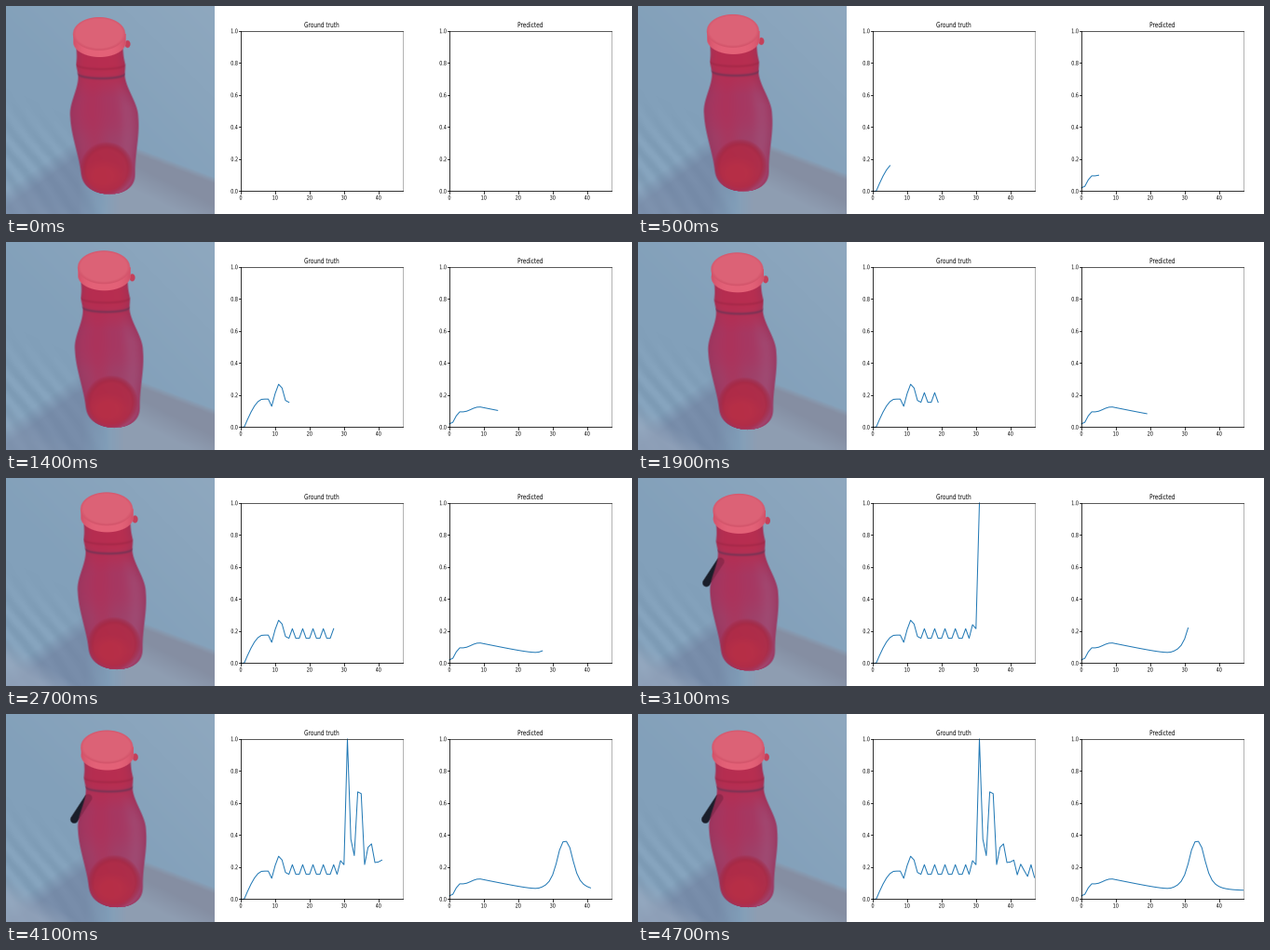
A matplotlib script for the animation above (4.8 s loop, 672 by 224 pixels).

```python
import numpy as np
import matplotlib.pyplot as plt
from matplotlib.animation import FuncAnimation
from matplotlib.patches import PathPatch
from matplotlib.textpath import TextPath
from matplotlib.transforms import Affine2D

N = 48
SIDE = 224
DPI = 100
PX = 72 / DPI
PEN_START = 31

Y, X = np.mgrid[0:SIDE, 0:SIDE] + 0.5


def smooth(t):
    t = np.clip(t, 0, 1)
    return t * t * (3 - 2 * t)


def tent(i, centre, height, width):
    return height * np.maximum(0, 1 - np.abs(i - centre) / width)


def truth(i):
    """Quick rise, steady ripple, two spikes, then a decaying ripple."""
    level = 0.175 * np.sin(np.pi / 2 * np.clip((i - 1) / 5.5, 0, 1))
    ripple = 0.04 * np.cos(2 * np.pi * i / 3) * (i > 12)
    bumps = tent(i, 9, -0.045, 1) + tent(i, 11.3, 0.11, 1.9) + tent(i, 29, 0.085, 1)
    spike = np.where(i >= 31, 0.845 * np.exp(-1.35 * np.maximum(i - 31, 0)), 0)
    early = level + ripple + bumps + spike + tent(i, 34.5, 0.75, 1.5)
    late = 0.16 + 0.14 * np.exp(-(i - 38) / 3) + 0.045 * np.cos(0.75 * np.pi * (i - 38))
    return np.where(i < 37, early, late)


def predicted(i):
    """Two-step rise, slow decline, one rounded peak."""
    rise = 0.02 + 0.075 * smooth((i - 0.4) / 2.6) + 0.03 * smooth((i - 4) / 4.5)
    base = np.maximum(rise - 0.0044 * np.maximum(i - 9, 0), 0.052 * (i > 9))
    return base + 0.31 / (1 + (np.abs(i - 33.6) / 2.75) ** 2.8)


def drift(k):
    dx = 8.6 * np.sin(np.pi * k / 70)
    dy = 8.8 * smooth((k - 10) / 25) - 3.3 * smooth(k / 6)
    return dx, dy


def soft(d, width=1.0):
    return np.clip(0.5 + d / width, 0, 1)


def ellipse(x, y, cx, cy, rx, ry, width=1.0):
    r = np.hypot((x - cx) / rx, (y - cy) / ry)
    return soft((1 - r) * min(rx, ry), width)


def segment(x, y, a, b, radius, width=1.5):
    dx, dy = b[0] - a[0], b[1] - a[1]
    t = np.clip(((x - a[0]) * dx + (y - a[1]) * dy) / (dx * dx + dy * dy), 0, 1)
    return soft(radius - np.hypot(x - a[0] - t * dx, y - a[1] - t * dy), width)


def blend(img, rgb, mask):
    return img + (np.array(rgb, float) - img) * mask[..., None]


def cloth(x, y, k):
    img = np.empty((SIDE, SIDE, 3))
    img[:] = (130, 160, 186)
    img = blend(img, (146, 170, 192), np.clip((X - Y + 40) / 330, 0, 1))
    # folds at the lower left
    ridge = np.sin((X - 0.75 * Y) / 3.5 + 0.6 * np.sin(Y / 17))
    zone = soft(Y - 118 - 0.45 * X, 60) * soft(85 - X, 50)
    img = img + (ridge * zone * 5)[..., None]
    left = soft(y - 208 + 0.72 * x, 20) * soft(92 - x, 30)
    img = blend(img, (112, 127, 158), 0.6 * left)
    corner = soft(Y - 185 - 0.65 * X, 24)
    img = blend(img, (152, 168, 190), corner * (0.15 + 0.55 * smooth((k - 12) / 8)))
    # cast shadow to the right
    top = y - 156 - 0.38 * (x - 140)
    low = 186 + 0.5 * (x - 140) - y
    right = soft(x - 112, 20)
    img = blend(img, (148, 156, 174), 0.7 * soft(top, 7) * right)
    return blend(img, (130, 138, 158), 0.75 * soft(top, 7) * soft(low, 26) * right)


def outline(y):
    """Centre and half width of the bottle at each height."""
    mid = 101.5 + 0.067 * (y - 60)
    half = 25 + 11.5 * smooth((y - 74) / 44) - 7.5 * smooth((y - 122) / 62)
    half = half + 1.2 * np.exp(-((y - 64) / 7) ** 2)
    foot = np.clip((y - 178) / 25, 0, 1)
    return mid, half * np.sqrt(1 - foot ** 2.5) + 0.01


def photo(k):
    dx, dy = drift(k)
    x, y = X - dx, Y - dy
    img = cloth(x, y, k)
    pen = segment(x, y, (65, 108), (80, 85), 4.2) if k >= PEN_START else 0 * x
    img = blend(img, (26, 30, 42), pen)

    mid, half = outline(y)
    u = np.clip((x - mid) / half, -1, 1)
    body = soft(half - abs(x - mid), 2) * soft(203 - y, 2) * soft(y - 46)
    tint = np.empty_like(img)
    tint[:] = (166, 56, 98)
    tint = blend(tint, (184, 46, 80), soft(84 - y, 30))
    tint = blend(tint, (156, 68, 108), 0.7 * np.exp(-((y - 148) / 18) ** 2))
    tint = blend(tint, (142, 50, 90), 0.5 * np.abs(u) ** 5)
    tint = blend(tint, (160, 84, 124), 0.5 * np.exp(-((u - 0.7) / 0.25) ** 2) * soft(y - 95, 30))
    tint = blend(tint, (180, 44, 82), 0.4 * np.exp(-((u + 0.35) / 0.35) ** 2))
    base = ellipse(x, y, 108, 175, 26, 26, 6)
    tint = blend(tint, (176, 42, 68), 0.85 * base)
    rim = base * (1 - ellipse(x, y, 108, 177, 24, 25, 6))
    tint = blend(tint, (146, 36, 66), 0.5 * rim)
    tint = blend(tint, (190, 50, 70), 0.5 * ellipse(x, y, 105, 183, 17, 13, 10))
    tint = blend(tint, (90, 24, 50), 0.35 * pen)
    img = blend(img, tint, body)

    # neck rings
    bow = 5 * np.sqrt(1 - u ** 2) - 3
    for ring, rgb, a in ((76, (104, 52, 84), 0.65), (66, (152, 36, 66), 0.45)):
        img = blend(img, rgb, a * body * np.exp(-((y - ring - bow) / 1.5) ** 2))

    # cap
    img = blend(img, (196, 64, 90), ellipse(x, y, 130.5, 41, 3, 4))
    sides = soft(28 - abs(x - 100.5)) * soft(y - 30) * soft(39 - y)
    side = np.maximum(ellipse(x, y, 100.5, 39, 28, 16), sides)
    img = blend(img, (228, 98, 120), side)
    img = blend(img, (208, 80, 104), side * np.abs((x - 100.5) / 28).clip(0, 1) ** 4)
    img = blend(img, (212, 86, 108), ellipse(x, y, 100, 30, 28, 18))
    img = blend(img, (220, 98, 118), ellipse(x, y, 100, 29.5, 26.5, 16.5, 2))
    return np.clip(img, 0, 255).astype(np.uint8)


# Each chart is a 640x480 drawing scaled into a square pane.
W, H = 640, 480
LEFT, RIGHT, BOTTOM, TOP = 80, 576, 52.8, 422.4
TICK = 4.86


def to_x(i):
    return LEFT + (RIGHT - LEFT) * i / (N - 1)


def to_y(v):
    return BOTTOM + (TOP - BOTTOM) * v


def rule(ax, x0, y0, x1, y1, color="black"):
    ax.plot([x0, x1], [y0, y1], color=color, lw=0.8 * PX, snap=True, zorder=3)


def label(ax, s, x, y, size, align):
    path = TextPath((0, 0), s, size=size)
    box = path.get_extents()
    shift = {"center": (box.x0 + box.x1) / 2, "right": box.x1}[align]
    path = path.transformed(Affine2D().translate(x - shift, y))
    ax.add_patch(PathPatch(path, fc="black", ec="none", lw=0))


def chart(column, title):
    ax = fig.add_axes([column / 3, 0, 1 / 3, 1])
    ax.set(xlim=(0, W), ylim=(0, H))
    ax.axis("off")
    rule(ax, RIGHT, BOTTOM, RIGHT, TOP, "#a0a0a0")
    rule(ax, LEFT, TOP, RIGHT, TOP, "#303030")
    rule(ax, LEFT, BOTTOM, LEFT, TOP)
    rule(ax, LEFT, BOTTOM, RIGHT, BOTTOM)
    for t in range(0, 50, 10):
        x = to_x(t)
        rule(ax, x, BOTTOM, x, BOTTOM - TICK)
        label(ax, str(t), x, 33, 13.89, "center")
    for i in range(6):
        y = to_y(i / 5)
        rule(ax, LEFT, y, LEFT - TICK, y)
        label(ax, f"{i / 5:.1f}", LEFT - 2 * TICK, y - 5.06, 13.89, "right")
    label(ax, title, (LEFT + RIGHT) / 2, TOP + 8.33, 16.67, "center")
    return ax.plot([], [], color="#1f77b4", lw=PX, zorder=2)[0]


fig = plt.figure(figsize=(3 * SIDE / DPI, SIDE / DPI), dpi=DPI, facecolor="white")
photo_ax = fig.add_axes([0, 0, 1 / 3, 1])
photo_ax.axis("off")
picture = photo_ax.imshow(photo(0), interpolation="nearest", aspect="auto")

steps = np.arange(N)
curves = [(chart(1, "Ground truth"), to_y(truth(steps))),
          (chart(2, "Predicted"), to_y(predicted(steps)))]


def update(k):
    picture.set_data(photo(k))
    for line, ys in curves:
        line.set_data(to_x(steps[:k + 1]), ys[:k + 1])
    return [picture] + [line for line, _ in curves]


anim = FuncAnimation(fig, update, frames=N, interval=100, repeat=True)
plt.show()
```
